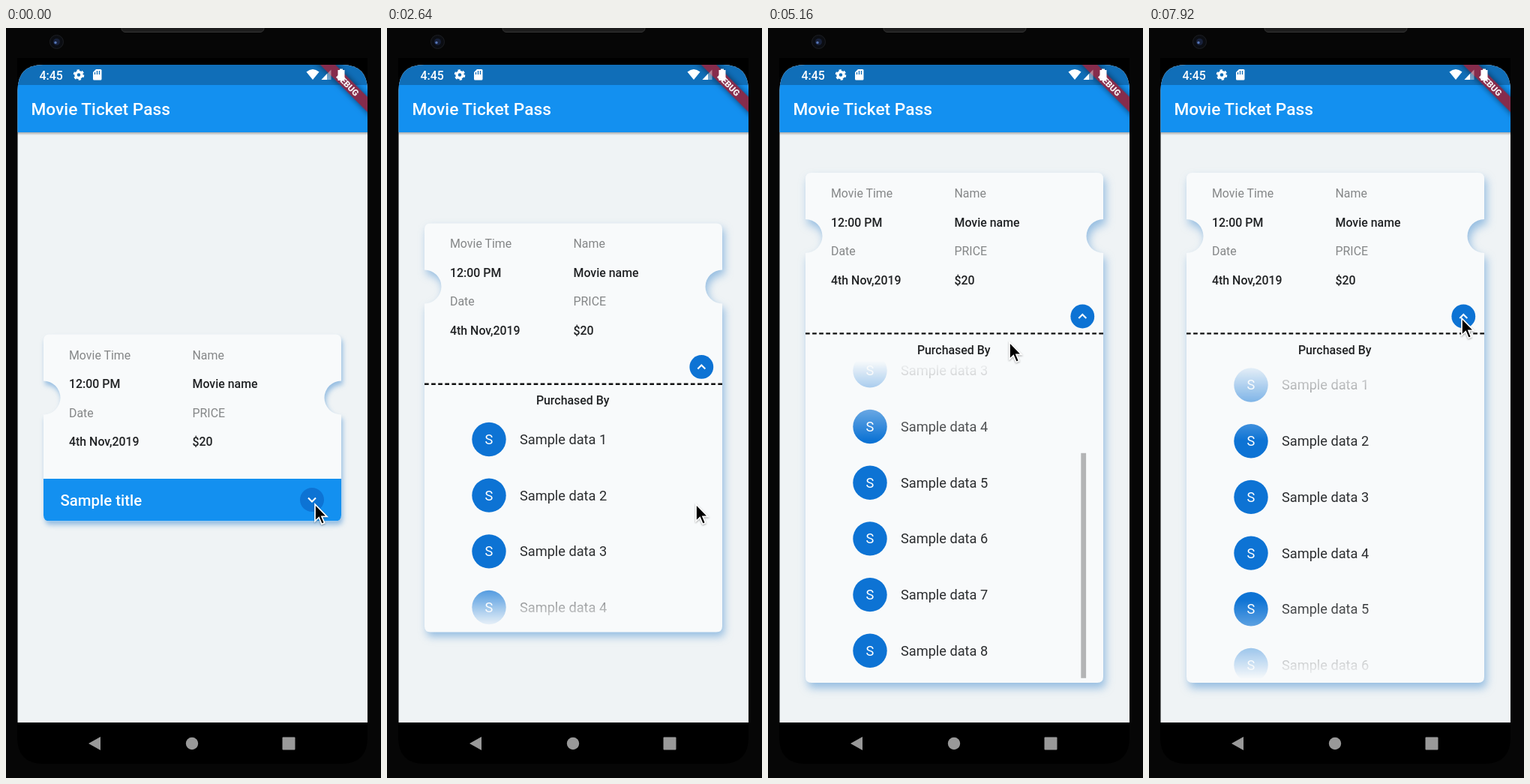
Write an HTML page that moves like this. It is 500x1000 px and loops after 8 s.

```html
<!DOCTYPE html>
<html lang="en">
<head>
<meta charset="utf-8">
<title>Movie Ticket Pass</title>
<style>
  html, body { margin: 0; width: 100%; height: 100%; overflow: hidden; background: #060606; }
  svg { display: block; width: 500px; height: 1000px; font: 15.9px Roboto, sans-serif; }
  .medium { font-weight: 500; }
  .label { fill: #858788; }
  .ink { fill: #202224; font-weight: 500; }
  .chevron { fill: none; stroke: #fff; stroke-width: 2.1; }
  #cursor { filter: drop-shadow(0 1px 1px rgba(0, 0, 0, .35)); }
</style>
</head>
<body>
<svg viewBox="0 0 500 1000">
  <defs>
    <clipPath id="screen"><path d="M15.500 926V83q0-34 34-34H448q34 0 34 34V926Z"/></clipPath>
    <clipPath id="ticketClip"><path id="clipShape"/></clipPath>
    <linearGradient id="fade" x2="0" y2="1">
      <stop id="fadeTop" stop-color="#fff"/>
      <stop offset=".25" stop-color="#fff"/>
      <stop offset=".75" stop-color="#fff"/>
      <stop id="fadeBottom" offset="1" stop-color="#fff"/>
    </linearGradient>
    <linearGradient id="barShadow" x2="0" y2="1">
      <stop stop-opacity=".3"/><stop offset="1" stop-opacity="0"/>
    </linearGradient>
    <mask id="listMask" maskUnits="userSpaceOnUse" x="50" y="251" width="397" height="430">
      <rect id="maskArea" x="50" y="251" width="397" fill="url(#fade)"/>
    </mask>
  </defs>

  <!-- phone body -->
  <path d="M15 40H482V946q0 35-35 35H50q-35 0-35-35Z"/>
  <rect x="154" y="-6" width="190" height="11.500" rx="5" fill="#1d1d1d" stroke="#343434"/>
  <circle cx="67.500" cy="18.500" r="9" fill="#0b0d12" stroke="#1c1e22"/>
  <circle cx="67.500" cy="18.500" r="4.500" fill="#18213a"/>
  <circle cx="66" cy="19.500" r="1.700" fill="#5575b5"/>
  <g fill="#999">
    <path d="M110 954L126 945V963Z"/>
    <circle cx="248" cy="954" r="8.200"/>
    <rect x="368.500" y="945.500" width="17" height="17" rx="1"/>
  </g>

  <g clip-path="url(#screen)">
    <rect x="15" y="49" width="468" height="878" fill="#eff3f5"/>
    <rect x="15" y="139" width="468" height="4" fill="url(#barShadow)"/>
    <rect x="15" y="76" width="468" height="63" fill="#1390f0"/>
    <rect x="15" y="49" width="468" height="27" fill="#106eb8"/>
    <text x="33.500" y="116" class="medium" font-size="22.700" fill="#fff">Movie Ticket Pass</text>
    <g transform="translate(455.500 75.500) rotate(45)">
      <rect x="-60" y="-7.200" width="120" height="14.400" fill="#862c4c"
            style="filter:drop-shadow(0 0 4px rgba(0,0,0,.55))"/>
      <text y="4.200" font-size="11.600" font-weight="900" text-anchor="middle" fill="#f4f0f2">DEBUG</text>
    </g>
    <g fill="#fff">
      <text x="44.500" y="68.500" class="medium">4:45</text>
      <circle cx="97" cy="62.500" r="4" fill="none" stroke="#fff" stroke-width="3.400"/>
      <circle cx="97" cy="62.500" r="6.200" fill="none" stroke="#fff" stroke-width="2.200" stroke-dasharray="3.250"/>
      <path d="M120 55H126q1.500 0 1.500 1.500V68q0 1.500-1.500 1.500H117.500q-1.500 0-1.500-1.500V59Z"/>
      <path d="M118.500 59v3M121.500 57v5M124.500 57v5" stroke="#106eb8" stroke-width="1.300"/>
      <path d="M400.500 58.500Q409 51.500 417.500 58.500L409 69Z"/>
      <path d="M433.500 55.500V69H420.500Z" opacity=".4"/>
      <path d="M428 61V69H420.500Z"/>
      <path d="M445 54.500h4V56h2.500V70H442.500V56H445Z"/>
    </g>
  </g>

  <g id="ticket">
    <path id="shape" fill="#f8fafb"/>
    <g clip-path="url(#ticketClip)">
      <g id="info"></g>
      <g id="closed">
        <rect x="50" y="192.500" width="397" height="57" fill="#1390f0"/>
        <text x="72.500" y="228" class="medium" font-size="20.400" fill="#fff">Sample title</text>
        <circle cx="408" cy="220.500" r="16" fill="#0d73d4"/>
        <path class="chevron" d="M403 218l5 5 5-5"/>
      </g>
      <g id="open">
        <circle cx="419.300" cy="191.500" r="15.900" fill="#0d73d4"/>
        <path class="chevron" d="M414.300 194l5-5 5 5"/>
        <path d="M50 214.300H447" stroke="#111" stroke-width="2.300" stroke-dasharray="5.700 3.400"/>
        <text x="247.700" y="241.500" class="ink" text-anchor="middle">Purchased By</text>
        <g mask="url(#listMask)"><g id="list" font-size="18.200"></g></g>
        <rect id="thumb" x="417.300" width="6.800" height="300" fill="#b3b4b5"/>
      </g>
    </g>
  </g>

  <path id="cursor" d="M0 0V22.500L5.200 17.700L9 26.500L12.700 24.900L9 16.300H16Z" stroke="#fff" stroke-width="1.700"/>
</svg>

<script>
  const LOOP = 8000, STEP = 120;
  const ROW = 74.7, ROWS = 8, CLOSED = 249, OPEN = 680, MAX_SCROLL = 173.6;
  const $ = id => document.getElementById(id);
  const clamp = v => Math.max(0, Math.min(1, v));

  // Each key is [time, ...values]; values between keys are linear.
  const cursorKeys = [
    [0, 412, 635], [2700, 412, 635], [3480, 414, 384], [3600, 414, 384],
    [4200, 292, 495], [4440, 288, 635], [4680, 288, 635], [5160, 322, 419],
    [5640, 322, 419], [6240, 262, 612], [6360, 263, 685], [6720, 263, 782],
    [7200, 263, 782], [7920, 417, 387]
  ];
  const scrollKeys = [
    [4720, 0], [5130, MAX_SCROLL], [6240, MAX_SCROLL], [6360, 106.5], [6720, 5]
  ];
  const thumbKeys = [
    [4740, 0], [5040, 1], [5760, 1], [6060, 0], [6240, 0], [6540, 1], [7300, 1], [7600, 0]
  ];

  function sample(keys, t) {
    const next = keys.findIndex(k => k[0] > t);
    if (next === 0) return keys[0].slice(1);
    if (next < 0) return keys[keys.length - 1].slice(1);
    const a = keys[next - 1], b = keys[next], p = (t - a[0]) / (b[0] - a[0]);
    return a.slice(1).map((v, i) => v + (b[i + 1] - v) * p);
  }

  function ticketPath(h) {
    return `M58 0H439q8 0 8 8V62a22.500 22.500 0 0 0 0 45V${h - 8}q0 8-8 8` +
      `H58q-8 0-8-8V107a22.500 22.500 0 0 0 0-45V8q0-8 8-8Z`;
  }

  const fields = [
    ['Movie Time', '12:00 PM', 84, 33], ['Name', 'Movie name', 248.5, 33],
    ['Date', '4th Nov,2019', 84, 110], ['PRICE', '$20', 248.5, 110]
  ];
  $('info').innerHTML = fields.map(([label, value, x, y]) =>
    `<text class="label" x="${x}" y="${y}">${label}</text>
     <text class="ink" x="${x}" y="${y + 38.6}">${value}</text>`).join('');

  $('list').innerHTML = Array.from({ length: ROWS }, (_, i) =>
    `<g transform="translate(136 ${288 + i * ROW})">
       <circle r="22.700" fill="#0d73d4"/>
       <text y="6.400" text-anchor="middle" fill="#fff">S</text>
       <text x="41" y="6.400" fill="#2b2d2f">Sample data ${i + 1}</text>
     </g>`).join('');

  function draw(t) {
    const p = clamp((t - 1953) / 1000);
    const height = CLOSED + (OPEN - CLOSED) * p;
    const path = ticketPath(height);
    $('ticket').setAttribute('transform', `translate(0 ${533 - height / 2})`);
    $('shape').setAttribute('d', path);
    $('clipShape').setAttribute('d', path);
    $('shape').style.filter =
      `drop-shadow(${2.5 + p}px ${5 + 2 * p}px ${3 + 3 * p}px rgba(60, 135, 205, .5))`;
    $('closed').style.display = p > 0 ? 'none' : '';
    $('open').style.display = p > 0 ? '' : 'none';

    const [scroll] = sample(scrollKeys, t);
    $('list').setAttribute('transform', `translate(0 ${-scroll})`);
    $('maskArea').setAttribute('height', Math.max(0, height - 256));
    $('fadeTop').setAttribute('stop-opacity', scroll > 0 ? 0 : 1);
    $('fadeBottom').setAttribute('stop-opacity', scroll < MAX_SCROLL ? 0 : 1);
    $('thumb').setAttribute('y', 250 + scroll * .713);
    $('thumb').setAttribute('opacity', sample(thumbKeys, t)[0]);

    const [x, y] = sample(cursorKeys, t);
    $('cursor').setAttribute('transform', `translate(${x} ${y})`);
  }

  function tick() {
    const t = performance.now() % LOOP;
    draw(Math.floor(t / STEP) * STEP);
    requestAnimationFrame(tick);
  }
  tick();
</script>
</body>
</html>
```
